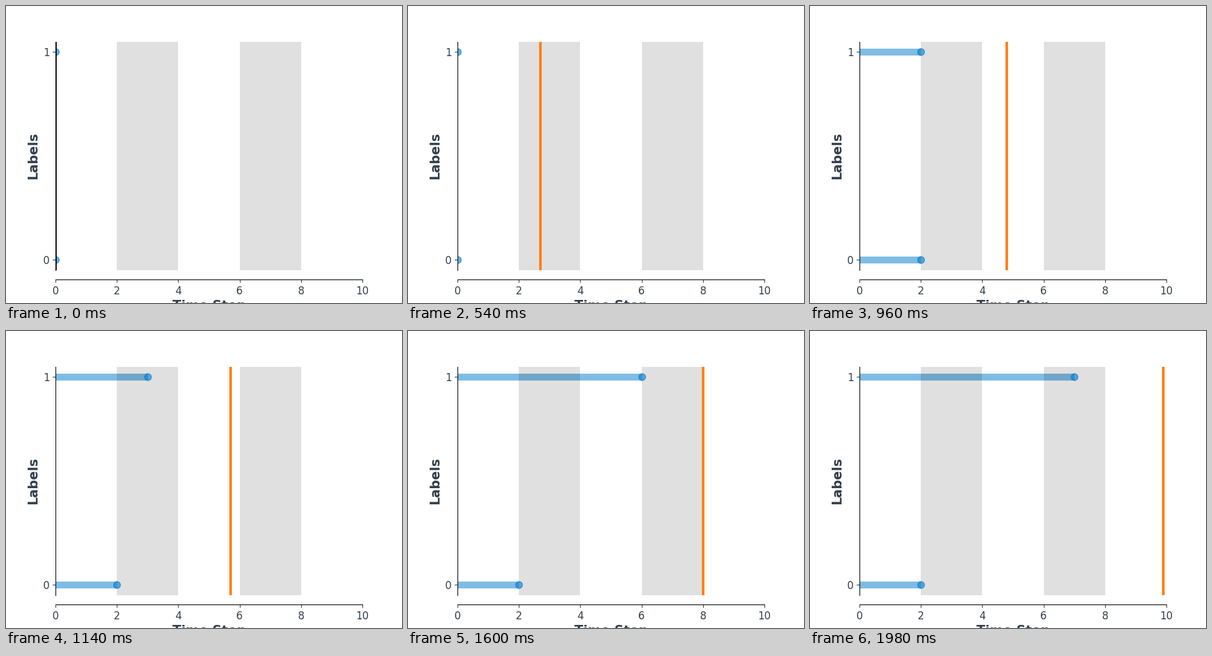
Recreate the animation shown at these times as a matplotlib script. Size 640 px wide and 480 px high, loop 2 s.

```python
import matplotlib.pyplot as plt
from matplotlib.animation import FuncAnimation

BLUE, ORANGE, SLATE = "#007ACC", "#ff7f0e", "#333F4B"
FRAMES, STEP_FRAMES = 100, 10
LAG = 2
CAPS = (2, 10)  # furthest step each label's bar may reach

plt.rcParams["font.family"] = "DejaVu Sans"
fig, ax = plt.subplots(figsize=(6.4, 4.8), dpi=100)
ax.set_xlim(0, 10)
ax.set_ylim(-0.05, 1.05)
ax.set_yticks([0, 1])

for side in ("top", "right"):
    ax.spines[side].set_visible(False)
ax.spines["bottom"].set_position(("axes", -0.04))
ax.tick_params(labelsize=12, color=SLATE, labelcolor=SLATE)
label_style = dict(fontsize=15, fontweight="bold", color=SLATE)
ax.set_xlabel("Time Step", **label_style)
ax.set_ylabel("Labels", **label_style)

for start in (2, 6):
    ax.axvspan(start, start + 2, facecolor="black", alpha=0.12, lw=0, zorder=1.5)

bars = [ax.plot([0, 0], [y, y], color=BLUE, alpha=0.5, lw=8,
                solid_capstyle="butt", zorder=1)[0] for y in (0, 1)]
dots = [ax.plot([0], [y], "o", color=BLUE, alpha=0.6, ms=8)[0] for y in (0, 1)]
cursor = ax.axvline(0, color=ORANGE, lw=3)


def update(i):
    cursor.set_xdata([i / STEP_FRAMES] * 2)
    # the cursor rests as a thin black rule on the axis before it sets off
    cursor.set_color(ORANGE if i else "black")
    cursor.set_linewidth(3 if i else 2)
    reached = max(0, i // STEP_FRAMES - LAG)
    for bar, dot, cap in zip(bars, dots, CAPS):
        end = min(reached, cap)
        bar.set_xdata([0, end])
        bar.set_visible(end > 0)
        dot.set_xdata([end])
    return [cursor, *bars, *dots]


anim = FuncAnimation(fig, update, frames=FRAMES, interval=20,
                     repeat=True, repeat_delay=0, blit=False)
plt.show()
```
